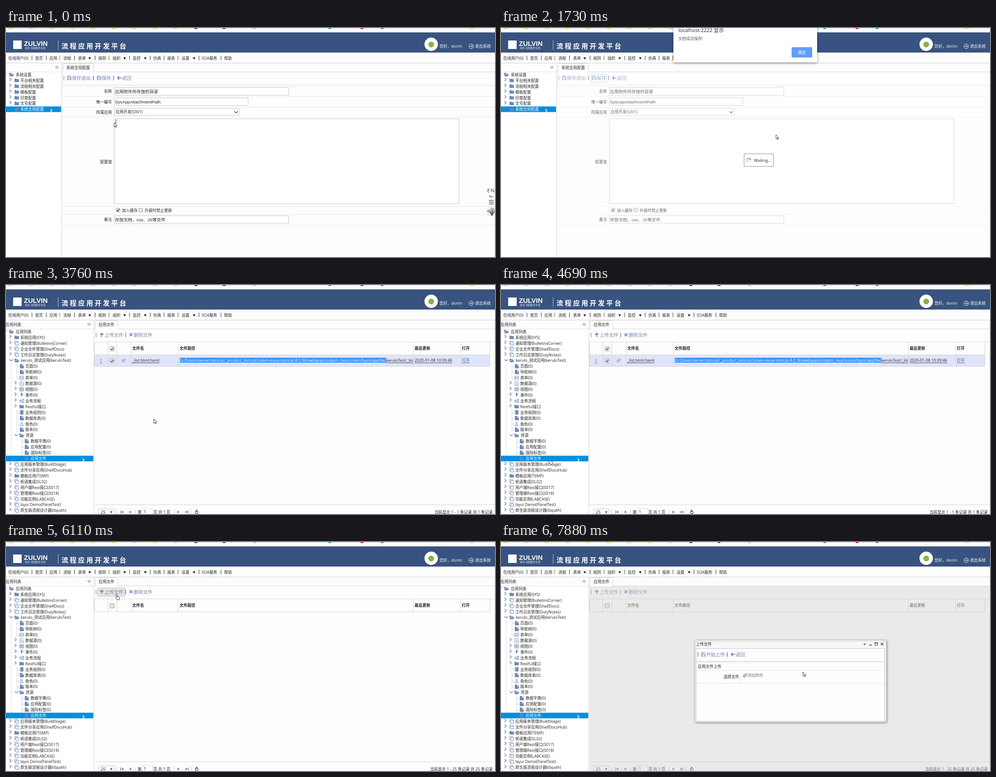
Recreate the animation shown at these times as an HTML page with a canvas. Size 1092 by 513 pixels, loop 8 s.

```html
<!DOCTYPE html>
<html lang="zh-CN">
<head>
<meta charset="utf-8">
<title>流程应用开发平台</title>
<style>
html, body { margin: 0; width: 100%; height: 100%; overflow: hidden; background: #fff; }
canvas { display: block; }
</style>
</head>
<body>
<canvas id="stage" width="1092" height="513"></canvas>
<script>
(() => {
const ctx = document.getElementById('stage').getContext('2d');
const LOOP = 8000;
const SANS = '"Open Sans", "Noto Sans CJK SC", "Noto Sans CJK", sans-serif';
const ARIAL = '"Liberation Sans", "Noto Sans CJK SC", "Noto Sans CJK", sans-serif';
const INK = '#222', BLUE = '#7088b6', LINE = '#e2e2e2', BOX = '#c4c4c4';

// ---- timing: the screen refreshes in short bursts [from, to, steps]
const bursts = [[0, 0, 1], [250, 940, 6], [1210, 1730, 5], [1880, 2150, 3], [2300, 3110, 7],
  [3640, 4570, 8], [4690, 4690, 1], [4970, 5960, 8], [6110, 6350, 2], [6500, 7040, 5], [7190, 7880, 6]];
const ticks = bursts.flatMap(([a, b, n]) =>
  Array.from({ length: n }, (_, i) => Math.round(a + (n > 1 ? (b - a) * i / (n - 1) : 0))));
const snap = t => ticks.filter(k => k <= t).pop();

const route = [
  [0, 241.5, 212], [112, 241.5, 212], [388, 262, 150], [526, 264, 111], [664, 258, 111],
  [802, 222, 111], [940, 219, 111], [1470, 219, 111], [1730, 614, 239], [2150, 672, 52],
  [2435, 672, 52], [2840, 690, -20], [3639, 690, -20], [3640, 330, 300], [4570, 109, 389],
  [5112, 109, 389], [5960, 247, 117], [7050, 247, 117], [7880, 674.5, 291]];

function pointer(t) {
  const i = route.findIndex(p => p[0] > t);
  if (i < 0) return route[route.length - 1].slice(1);
  const [t0, x0, y0] = route[i - 1], [t1, x1, y1] = route[i];
  const k = (t - t0) / (t1 - t0);
  return [x0 + (x1 - x0) * k, y0 + (y1 - y0) * k];
}

// ---- drawing helpers
function text(s, x, y, { size = 8.75, color = INK, bold = false, align = 'left', font = SANS, gap = 0 } = {}) {
  ctx.font = `${bold ? 'bold ' : ''}${size}px ${font}`;
  ctx.letterSpacing = gap + 'px';
  ctx.textAlign = align;
  ctx.fillStyle = color;
  ctx.fillText(s, x, y + size * 0.38);
  return ctx.measureText(s).width;
}
function fill(x, y, w, h, c) { ctx.fillStyle = c; ctx.fillRect(x, y, w, h); }
const hline = (x0, x1, y, c = LINE) => fill(x0, y, x1 - x0, 1, c);
const vline = (x, y0, y1, c = LINE, w = 1) => fill(x, y0, w, y1 - y0, c);
function frame(x, y, w, h, c = BOX, bg) {
  if (bg) fill(x, y, w, h, bg);
  ctx.strokeStyle = c;
  ctx.lineWidth = 1;
  ctx.strokeRect(x + 0.5, y + 0.5, w - 1, h - 1);
}
function round(x, y, w, h, r, bg, border) {
  ctx.beginPath();
  ctx.roundRect(x, y, w, h, r);
  ctx.fillStyle = bg;
  ctx.fill();
  if (border) { ctx.strokeStyle = border; ctx.lineWidth = 1; ctx.stroke(); }
}
function disc(x, y, r, c) {
  ctx.beginPath();
  ctx.arc(x, y, r, 0, 7);
  ctx.fillStyle = c;
  ctx.fill();
}
function shape(d, x, y, { bg, line, w = 1, k = 1 }) {
  ctx.save();
  ctx.translate(x, y);
  ctx.scale(k, k);
  const p = new Path2D(d);
  if (bg) { ctx.fillStyle = bg; ctx.fill(p); }
  if (line) { ctx.strokeStyle = line; ctx.lineWidth = w; ctx.stroke(p); }
  ctx.restore();
}
const shadow = (c, blur, dx = 0, dy = 0) =>
  Object.assign(ctx, { shadowColor: c, shadowBlur: blur, shadowOffsetX: dx, shadowOffsetY: dy });
const noShadow = () => shadow('transparent', 0);

// icons live in a 10 by 10 box: [path, stroke width or 0 for a fill]
const icons = {
  folder: ['M0 1h4l1 1.2h5V9H0z', 0],
  open: ['M0 8V1h3.6l1 1.2h3.9v1.4H2.6z M2.9 4.4H11L8.6 9H.4z', 0],
  copy: ['M2.5 7H.5V.5H7v2 M2.8 2.8h6.7v6.7H2.8z', 1],
  doc: ['M1 0h5v4h4v6H1z M7 0l3 3H7z', 0],
  form: ['M.5 1h9v8h-9z M.5 3.3h9 M2 5h2v2H2z M5.5 5h3 M5.5 7h3', 0.8],
  data: ['M1 .5h5.5L9 3v6.5H1z M5 3v4 M3.5 5.5L5 7l1.5-1.5', 1],
  grid: ['M.5 1h9v8h-9z M.5 3.5h9 M.5 6.2h9 M3.5 1v8 M6.5 1v8', 0.9],
  bolt: ['M4 0h3.5L6 3.5h2.5L3.5 10l1-4.5h-2z', 0],
  gears: ['M1 5.5a2.3 2.3 0 1 0 4.6 0a2.3 2.3 0 1 0-4.6 0 M7 2.5a1.3 1.3 0 1 0 2.6 0a1.3 1.3 0 1 0-2.6 0 M7 8a1.3 1.3 0 1 0 2.6 0a1.3 1.3 0 1 0-2.6 0', 1.3],
  book: ['M1 0h1v10H1z M2.6 0H9v10H2.6z', 0],
  user: ['M3 3a2 2 0 1 0 4 0a2 2 0 1 0-4 0 M1 9.5c0-5 8-5 8 0z', 1],
  block: ['M1 1h9v9H1z', 0],
  save: ['M.5.5h7l2 2v7h-9z M2.5.5v3h4v-3 M2 9.5v-4h6v4', 1],
  back: ['M5 1L1 5l4 4 M1 5h9', 2],
  up: ['M1 5l4-4 4 4 M5 1v9', 2],
  cross: ['M1.5 1.5l6.5 6.5 M8 1.5L1.5 8', 2.2],
  clip: ['M8 3L4 7.2a1 1 0 0 1-1.6-1.4L6.5 1.5a1.8 1.8 0 0 1 2.6 2.6L4.6 8.8A2.6 2.6 0 0 1 .9 5.2L4.5 1.6', 1],
  next: ['M0 0l3.5 3.5L0 7', 1.5],
  down: ['M0 0l3.5 3.5L7 0', 1.5]
};
function icon(name, x, y, c = BLUE, k = 1) {
  const [d, w] = icons[name];
  shape(d, x, y, w ? { line: c, w, k } : { bg: c, k });
}
function tri(x, y, dir, c = '#333', r = 3) {
  const d = { down: `M${-r} ${-r / 2}h${2 * r}L0 ${r}z`, up: `M${-r} ${r / 2}h${2 * r}L0 ${-r / 2}z`,
    left: `M${r / 2} ${-r}v${2 * r}L${-r} 0z`, right: `M${-r / 2} ${-r}v${2 * r}L${r} 0z` };
  shape(d[dir], x, y, { bg: c });
}
function check(x, y, on, r = 4) {
  round(x - r, y - r, 2 * r, 2 * r, 1, on ? '#fafafa' : '#e8e8e8', '#8c8c8c');
  if (on) shape('M-2.6 0L-.6 2.2 2.8-2.4', x, y, { line: '#333', w: 1.6 });
}
function tool(name, label, x, tx, y = 112) {
  icon(name, x, y - 5, BLUE, 0.95);
  text(label, tx, y, { size: 10.5, color: BLUE });
}
const sep = (x, y, c) => vline(x, y - 5, y + 5, c, 1.4);
const hover = (x, w) => round(x, 102.5, w, 19.5, 3, '#e3e3e3', '#c9c9c9');
function focusRing(x0, x1) {
  ctx.setLineDash([1, 1]);
  ctx.strokeStyle = '#7d88a8';
  ctx.lineWidth = 1;
  ctx.strokeRect(x0 + 0.5, 103.5, x1 - x0, 18);
  ctx.setLineDash([]);
}

// ---- page top
const menu = [['在线用户(0)', 5, 58, '#3c6ea5'], ['首页', 65, 90, '#5b5fa8'], ['应用', 97, 120, '#c98a2b'],
  ['流程', 128, 153, '#555'], ['表单', 161, 199, '#a03050', 187], ['规则', 206, 230, '#a08a2c'],
  ['组织', 238, 276, '#3f8f52', 265], ['监控', 283, 322, '#3c6ea5', 311], ['仿真', 329, 353, '#4a6f9c'],
  ['报表', 360, 384, '#a0632c'], ['设置', 392, 431, '#8a3fa0', 420], ['SOA服务', 437, 480, '#3c6ea5'], ['帮助', 487]];

function banner() {
  fill(0, 0, 1092, 10, '#fbfbfb');
  hline(0, 1092, 0, '#d8d8d8');
  for (let i = 0; i < 9; i++) fill(6 + i * 46, 0, 9, 2, '#e2cf88');
  fill(1036, 0, 9, 2, '#e2cf88');
  [[424, '#444'], [487, '#555'], [555, '#b8bec6'], [723, '#3f8fd0'], [795, '#c8282c'], [840, '#4a9a5a']]
    .forEach(([x, c]) => disc(x, -1.5, 4, c));
  hline(0, 1092, 9, '#dcdcdc');

  fill(0, 10, 1092, 45, '#38537f');
  fill(16, 28, 19, 19, '#fff');
  text('ZULVIN', 40, 34.5, { size: 15, color: '#fff', bold: true, font: ARIAL });
  text('岚序·流程服务专家', 42, 45, { size: 5.6, color: '#e4eaf4' });
  vline(116, 27, 49, '#b9c4d8');
  text('流程应用开发平台', 124, 40, { size: 14.8, color: '#fff', bold: true, gap: 3.7 });
  disc(949.5, 36.5, 15, '#fff');
  disc(949.5, 37, 6.5, '#8fb04a');
  text('您好，dorim', 968, 40.5, { color: '#fff' });
  shape('M-5 0a5 5 0 1 0 10 0a5 5 0 1 0-10 0 M-3 0h5.5 M.5-2.2L2.7 0 .5 2.2', 1039, 41, { line: '#fff' });
  text('退出系统', 1047.5, 40.5, { color: '#fff' });

  fill(0, 55, 1092, 23, '#fdfdfd');
  for (const [s, x, bar, c, arrow] of menu) {
    text(s, x, 67.5);
    if (bar) sep(bar - 0.7, 67, c);
    if (arrow) tri(arrow, 67.5, 'down', '#111');
  }
  hline(0, 1092, 78, '#cfcfcf');
}

// ---- side tree: [level, mark, icon, label]
const configTree = [[0, '', 'open', '系统设置'],
  ...['平台相关', '流程相关', '模板', '印章', '文号'].map(s => [1, '>', 'folder', s + '配置']),
  [1, '*', 'block', '系统全局配置']];
const appTree = [[0, '', 'open', '应用列表'], [1, '>', 'folder', '系统应用(SYS)'],
  [1, '>', 'copy', '通知管理(BulletinsCorner)'], [1, '>', 'copy', '企业文件管理(ShelfDocs)'],
  [1, '>', 'copy', '工作日志管理(DutyNotes)'], [1, 'v', 'open', 'kerulo_测试应用(keruloTest)'],
  [2, '', 'doc', '页面(0)'], [2, '', 'doc', '导航树(0)'], [2, '', 'form', '表单(0)'],
  [2, '>', 'data', '数据源(0)'], [2, '>', 'grid', '视图(0)'], [2, '>', 'bolt', '事件(0)'],
  [2, '>', 'gears', '业务流程'], [2, '>', 'folder', 'Restful接口'], [2, '', 'book', '业务规则(0)'],
  [2, '', 'doc', '数据库表(0)'], [2, '', 'user', '角色(0)'], [2, '', 'doc', '版本(0)'],
  [2, 'v', 'open', '资源'], [3, '', 'doc', '数据字典(0)'], [3, '', 'doc', '应用配置(0)'],
  [3, '', 'doc', '国际标签(0)'], [3, '*', 'doc', '应用文件'], [1, '>', 'copy', '应用版本管理(BuildStage)'],
  [1, '>', 'copy', '文件分享应用(ShelfDocsHub)'], [1, '>', 'folder', '模板应用(TEMP)'],
  [1, '>', 'copy', '帆语集成(SL02)'], [1, '>', 'copy', '用户端Rest接口(S017)'],
  [1, '>', 'copy', '管理端Rest接口(S018)'], [1, '>', 'copy', '功能实例(LABCASE)'],
  [1, '>', 'copy', 'layui Demo(PanelTest)'], [1, '>', 'copy', '原生版流程设计器(tbpath)']];
const iconX = [7, 19, 30, 41], textX = [22, 32, 43, 55], markX = [0, 8, 19.5, 31];

function side(rows, width, title) {
  fill(0, 79, width, 434, '#fff');
  fill(0, 79, width, 19, '#fdfdfd');
  hline(0, width, 98);
  if (title) text(title, -1, 88.5);
  shape('M3.5 0L.5 3l3 3 M7 0L4 3l3 3', width - 14, 85, { line: '#555' });
  shape('M0 4L4 0', -1, 101, { line: '#8a9ab8' });
  rows.forEach(([level, mark, name, label], i) => {
    const y = 104.5 + i * 12.92, x = iconX[level], on = mark === '*';
    if (on) {
      fill(0, y - 6.3, width - 1, 12.6, '#058fdf');
      icon('next', width - 25, y - 0.5, '#fff');
    }
    if (level > 1) {
      if (!on) vline(11, y - 6.5, y + 6.5, '#dedede');
      if (!mark) {
        vline(x - 6, y - 6.5, y + 6.5, '#cfcfcf');
        hline(x - 6, x, Math.round(y), '#cfcfcf');
      }
    }
    if (mark === '>') icon('next', markX[level], y - 5.5);
    if (mark === 'v') icon('down', markX[level], y - 2.5);
    icon(name, x, y - 5, on ? '#5f86b8' : BLUE, 0.98);
    text(label, textX[level] + (mark === 'v' ? 1 : 0), y, { color: on ? '#fff' : INK });
  });
  vline(width, 79, 513, '#cfcfcf');
}
function tab(label, x, w) {
  fill(x - 2, 79, 1092, 434, '#fdfdfd');
  hline(x - 1, 1092, 98, '#d4d4d4');
  round(x + 0.5, 79.5, w, 19, [3, 3, 0, 0], '#fdfdfd', '#d4d4d4');
  fill(x + 1, 98, w - 1, 1, '#fdfdfd');
  text(label, x + 8, 89);
  vline(1091, 79, 513);
}

// ---- settings form
function settings(t) {
  side(configTree, 124);
  tab('系统全局配置', 127, 68);
  if (t >= 526 && t < 780) hover(244, 41);
  if (t >= 780 && t < 1210) hover(198.5, 40);
  if (t >= 1210) focusRing(201, 235);
  sep(128.5, 112, '#c9a040');
  tool('save', '保存退出', 136.5, 147);
  sep(194.5, 112, '#a84a50');
  tool('save', '保存', 203, 213.5);
  sep(239.5, 112, '#4a7fb0');
  tool('back', '返回', 248, 259);
  hline(126, 1091, 127);
  vline(126, 99, 128);
  [130, 153, 177, 199, 399, 417, 441].forEach(y => hline(126, 1091, y, '#e9e9e9'));
  vline(239, 130, 441, '#e9e9e9');
  [['名称', 142], ['唯一编号', 165.5], ['所属应用', 188.5], ['配置值', 299.5], ['备注', 429]]
    .forEach(([s, y]) => text(s, 236.5, y, { align: 'right' }));
  [[133, 390, 18], [156, 299, 18], [180, 279, 16], [203, 770, 191], [420, 390, 18]]
    .forEach(([y, w, h]) => frame(242, y, w, h, BOX, '#fff'));
  const entry = { size: 9.65, font: ARIAL };
  text('应用附件所存放的目录', 243.5, 142, entry);
  text('SysAppAttachmentPath', 243.5, 165.3, entry);
  text('应用开发(S001)', 245, 188);
  shape('M0 0l3.8 4L7.6 0', 510, 186.5, { line: '#555', w: 1.7 });
  text('存放文档、css、JS等文件', 243.5, 429, entry);
  check(250, 408, true);
  text('加入缓存', 259, 408.5);
  check(301, 408, false);
  text('升级时禁止更新', 309.5, 408.5);
  if (t < 526) vline(245, 205, 215, '#222');
  if (t < 1340) inputBar();
  if (t >= 1340 && t < 2435) waiting(t);
}
function waiting(t) {
  fill(126, 99, 965, 414, 'rgba(253,253,253,.32)');
  frame(542, 281, 67, 30, '#b5b5b5', '#fff');
  frame(543, 282, 65, 28, '#d0d0d0');
  const a = t / 130;
  ctx.lineWidth = 1.8;
  for (let i = 0; i < 8; i++) {
    ctx.strokeStyle = `rgba(60,100,160,${0.15 + i * 0.11})`;
    ctx.beginPath();
    ctx.arc(553, 296, 4.2, a + i * 0.7, a + i * 0.7 + 0.72);
    ctx.stroke();
  }
  text('Waiting...', 565, 296.5, { size: 9 });
}
function inputBar() {
  text('EN', 1074.5, 363.5, { size: 11, color: '#333', gap: 1.6 });
  shape('M0 0a4.2 4.2 0 0 0 8 2A4.6 4.6 0 0 1 0 0z', 1079.5, 374.5, { bg: '#333', line: '#333', w: 0.6 });
  for (let i = 0; i < 3; i++) fill(1078.5, 385.5 + i * 4, 10.5, 1.3, '#333');
  fill(1074, 399, 18, 23, '#f1f0ec');
  for (let i = 0; i < 8; i++)
    shape(`M0 0Q${i - 3} -9 ${i * 3.4 - 13} ${-19 + Math.abs(i - 4) * 2}`, 1085, 421, { line: i % 3 ? '#4b4a45' : '#8b8878', w: 1.1 });
  disc(1083, 407, 2, '#d9c79a');
}
function alertBox() {
  shadow('rgba(0,0,0,.4)', 6, 0, 2);
  fill(385, -5, 321, 82, '#fff');
  noShadow();
  text('localhost:2222 显示', 396, 5, { size: 11.3 });
  text('文档成功保存!', 396, 23.5, { color: '#555' });
  round(649, 43, 46, 23, 2, '#639cf8');
  text('确定', 672, 54.5, { color: '#fff', align: 'center' });
}

// ---- file list
const pathHead = 'G:/Zulvin/server/tomcat/_product_tomcat/zulvin-issue-tomcat-8.0.36/webapps/osbpm_itest/zulvin/bpm/appfile/';

function link(s, x, y, color = INK) {
  const w = text(s, x, y, { size: 8.9, color });
  fill(x, y + 5, w, 0.8, color);
  return w;
}
function fileRow() {
  fill(198, 157, 883, 25, '#dfe4fa');
  text('1', 212, 169.5, { color: '#9c3030', align: 'center' });
  fill(209.5, 174.5, 5, 0.8, '#9c3030');
  check(237, 170, true, 4.5);
  icon('clip', 258.5, 164.5, BLUE, 0.9);
  link('_list.html.haml', 282, 169);
  ctx.save();
  ctx.beginPath();
  ctx.rect(385, 157, 524, 25);
  ctx.clip();
  ctx.font = `8.9px ${SANS}`;
  ctx.letterSpacing = '0px';
  const w = ctx.measureText(pathHead).width;
  fill(388, 163, w, 12, '#3390ff');
  link(pathHead, 388, 169, '#fff');
  link('keruloTest/_list.html.haml', 388 + w, 169);
  ctx.restore();
  link('2020-01-08 10:39:46', 912.5, 169);
  link('打开', 1018, 169, '#3f5f92');
  hline(198, 1081, 182, '#d5d5d5');
}
function pager(total) {
  hline(198, 1092, 492, '#d4d4d4');
  frame(206, 501, 36, 16, BOX, '#fff');
  text('25', 211.5, 508, { size: 9.5 });
  tri(235, 508.5, 'down', '#222', 2.5);
  [247, 289, 375, 413].forEach(x => vline(x, 502, 513, '#d0d0d0'));
  vline(255.5, 505, 512, '#777', 1.3);
  tri(260.5, 508.5, 'left', '#777');
  tri(278, 508.5, 'left', '#777');
  text('第', 294, 508.5);
  frame(304, 500, 24, 16, '#d8d8d8', '#fff');
  text('1', 307.5, 507.5, { size: 9.5 });
  text('页 共 1 页', 329, 508.5);
  tri(384.5, 508.5, 'right', '#777');
  tri(402.5, 508.5, 'right', '#777');
  vline(406, 505, 512, '#777', 1.3);
  shape('M2.4-2A3.2 3.2 0 1 1-.8-3.1 M-.8-5v3.8l2.4-1.9z', 426, 509, { line: '#444', w: 1.2 });
  text(`当前显示 1 - ${total} 条记录 共 ${total} 条记录`, 1087, 508.5, { align: 'right' });
}
function files(t) {
  const fresh = t >= 5100, masked = t >= 6350;
  side(appTree, 196, '应用列表');
  tab('应用文件', 199, 50);
  if (t >= 5960 && !masked) hover(204.5, 62);
  if (masked && t < 7190) focusRing(207, 262);
  sep(200.5, 112, '#a89a48');
  tool('up', '上传文件', 209, 220);
  sep(266.5, 112, '#9a7a50');
  tool('cross', '删除文件', 274.5, 285);
  hline(198, 1091, 127, '#d8d8d8');
  hline(198, 1081, 156, '#d5d5d5');
  if (!fresh) fileRow();
  [197, 227, 247, 279, 384, 909, 1015, 1080].forEach(x => vline(x, 128, fresh ? 156 : 182, '#d5d5d5'));
  check(237, 143, !fresh, 4.7);
  [['文件名', 282], ['文件路径', 387.5], ['最后更新', 912.5], ['打开', 1018]]
    .forEach(([s, x]) => text(s, x, 142, { bold: !masked }));
  pager(fresh ? 25 : 1);
  if (masked) {
    fill(198, 99, 893, 414, 'rgba(204,204,204,.4)');
    upload(t >= 6500);
  }
}
function upload(ready) {
  shadow('rgba(0,0,0,.35)', 4, 1.5, 1.5);
  round(432.5, 219.5, 428, 184, 4, '#f8f8f8', '#c8c8c8');
  noShadow();
  text('上传文件', 435.5, 228.5);
  tri(812, 228.5, 'up', '#444', 3);
  fill(822, 230, 6, 1.6, '#444');
  shape('M-3-3h6v6h-6z M-3-2.2h6', 838, 228.5, { line: '#444', w: 1.2 });
  shape('M-2.8-2.8l5.6 5.6 M2.8-2.8l-5.6 5.6', 851, 228.5, { line: '#444', w: 1.5 });
  frame(435, 238, 422, 164, '#c4c4c4', '#fdfdfd');
  frame(435, 238, 422, 30, '#c4c4c4');
  [270, 287, 316].forEach(y => hline(436, 856, y, '#e6e6e6'));
  text('应用文件上传', 439.5, 279);
  if (ready) {
    sep(439, 252, '#667');
    tool('save', '开始上传', 447, 458, 252);
    sep(504.5, 252, '#667');
    tool('back', '返回', 513, 524, 252);
    text('选择文件', 497, 302);
    vline(535, 288, 316, '#e6e6e6');
    icon('clip', 540.5, 294, '#555', 0.95);
    text('添加附件', 551, 299, { color: '#777' });
  } else {
    const plain = { color: '#235a94' };
    text('|', 438.5, 247.5);
    text('开始上传', 443, 247.5, plain);
    text('|', 478, 247.5);
    text('返回', 482, 247.5, plain);
    text('选择文件', 442, 302);
    vline(507, 288, 316, '#e6e6e6');
  }
}

// ---- pointer
function drawPointer(t) {
  const hand = (t >= 526 && t < 1210) || (t >= 4690 && t < 5112) || (t >= 5810 && t < 6350);
  const [x, y] = pointer(t);
  if (hand) shape('M2.5.5c.8 0 1.1.5 1.1 1.1V5.4l4.2.9c.9.2 1.2.8 1 1.7l-.6 4.5H3.6L.3 8.6c-.6-.9.6-1.7 1.3-1V1.6c0-.6.3-1.1.9-1.1z',
    x - 2.5, y, { bg: '#fff', line: '#222', w: 0.9 });
  else shape('M0 0v9.5l2.2-1.9L3.7 11l1.5-.7-1.4-3.2h3z', x, y, { bg: '#fff', line: '#222', w: 0.9 });
}

function draw() {
  const t = snap(performance.now() % LOOP);
  fill(0, 0, 1092, 513, '#fdfdfd');
  banner();
  if (t < 3640) settings(t); else files(t);
  if (t >= 1470 && t < 2300) alertBox();
  drawPointer(t);
  requestAnimationFrame(draw);
}
draw();
})();
</script>
</body>
</html>
```
